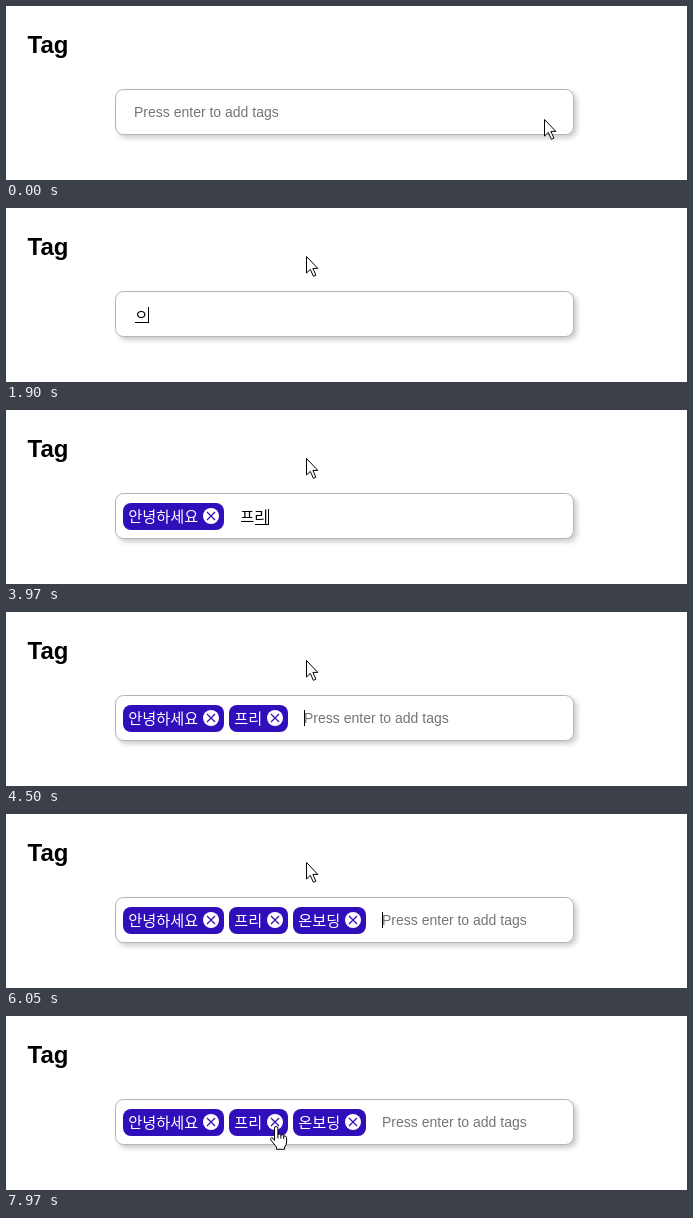
These frames come from a looping animation (681x174 px, 8000 ms). An HTML page:

```html
<!DOCTYPE html>
<html lang="ko">
<head>
<meta charset="utf-8">
<title>Tag input</title>
<style>
html, body { margin: 0; width: 681px; height: 174px; overflow: hidden; background: #fff; }
svg { display: block; }
text { font: 15.2px "Noto Sans CJK KR", "Noto Sans CJK", sans-serif; }
.title { font: bold 24px "Liberation Sans", Arial, sans-serif; }
.hint { font: 14px "Liberation Sans", Arial, sans-serif; fill: #757575; }
.box { fill: #fff; stroke: #b4b4b4; filter: drop-shadow(3px 3px 2.5px rgba(0, 0, 0, .2)); }
.tag rect { fill: #300fbb; }
.tag text, .tag circle { fill: #fff; }
.tag path { stroke: #300fbb; stroke-width: 1.2; }
.cursor { fill: #fff; stroke: #000; stroke-linejoin: round; }
</style>
</head>
<body>
<svg width="681" height="174">
  <text class="title" x="21.5" y="47">Tag</text>
  <rect class="box" x="109.5" y="83.5" width="458" height="45" rx="8"/>
  <g id="tags"></g>
  <text class="hint" id="hint" y="111">Press enter to add tags</text>
  <text id="typed" y="112"></text>
  <rect id="underline" y="114" height="1"/>
  <rect id="caret" width="1" height="16"/>
  <g id="pointer">
    <path id="arrow" class="cursor" d="M.5 .5V17L4.3 13.4L7.4 20.3L9.9 19.2L6.9 12.4H11.8Z"/>
    <path id="beam" fill="none" stroke="#000" d="M-3 -8.5H-1Q.5 -8.5 .5 -7V7Q.5 8.5 -1 8.5H-3M4 -8.5H2Q.5 -8.5 .5 -7M.5 7Q.5 8.5 2 8.5H4"/>
    <path id="hand" class="cursor" d="M-1.5 14.5V2.2a1.7 1.7 0 0 1 3.4 0V8.5q1.6-1.2 3 .6q1.8-.8 2.8 .8q2.4-.5 2.9 1.8V16q0 3-2 5v2.3H.5V21L-4.8 14.6q-1.4-2.2 .4-2.9q1.4-.2 2.9 2.8ZM1.9 8.5v4M4.9 9.1v3.6M7.7 9.9v3"/>
  </g>
</svg>
<script>
const LOOP = 8000, CHAR = 14, BLINK = 530, FOCUS = 560;
const $ = id => document.getElementById(id);
const set = (id, attrs) => { for (const k in attrs) $(id).setAttribute(k, attrs[k]); };
const show = (el, on) => { el.style.display = on ? '' : 'none'; };

// time added, label, left edge
const tags = [[3240, '안녕하세요', 117], [4500, '프리', 223], [6050, '온보딩', 287]];
const tagEnd = ([, label, x]) => x + 31 + CHAR * label.length;

// input content after each edit; the last syllable is being composed
const edits = [
  [0, ''],
  [1900, 'ㅇ'], [1990, '아'], [2080, '안'], [2180, '안ㄴ'], [2270, '안녀'], [2360, '안녕'],
  [2450, '안녕ㅎ'], [2540, '안녕하'], [2640, '안녕핫'], [2710, '안녕하세'], [2840, '안녕하세요'],
  [3240, ''], [3700, 'ㅍ'], [3800, '프'], [3890, '플'], [3970, '프리'],
  [4500, ''], [4900, 'ㅇ'], [5000, '오'], [5110, '온'], [5230, '온ㅂ'], [5300, '온보'],
  [5400, '온볻'], [5500, '온보디'], [5650, '온보딩'],
  [6050, '']
];

// pointer moves: start, end, from, to
const moves = [
  [40, 570, [538, 113], [290, 106]],
  [710, 1090, [290, 106], [300, 48]],
  [7200, 7900, [300, 48], [270.5, 104]],
  [7900, 7970, [270.5, 104], [269.5, 110]]
];

$('tags').innerHTML = tags.map(tag => {
  const [, label, x] = tag, end = tagEnd(tag);
  return `<g class="tag"><rect x="${x}" y="93" width="${end - x}" height="27" rx="8"/>
    <text x="${x + 5.3}" y="112">${label}</text><circle cx="${end - 13}" cy="106" r="8"/>
    <path d="M${end - 17} 102l8 8m0-8l-8 8"/></g>`;
}).join('');

function pointerAt(t) {
  const [start, end, from, to] = moves.filter(m => t >= m[0]).pop() || moves[0];
  const p = Math.min(1, Math.max(0, (t - start) / (end - start)));
  const ease = p * p * (3 - 2 * p);
  return from.map((v, i) => v + (to[i] - v) * ease);
}

function draw(t) {
  const added = tags.filter(tag => t >= tag[0]);
  [...$('tags').children].forEach((el, i) => show(el, i < added.length));
  const left = added.length ? tagEnd(added[added.length - 1]) + 16 : 128;

  const [last, text] = edits.filter(e => t >= e[0]).pop();
  const n = text.length;
  show($('hint'), !n);
  set('hint', { x: left });
  $('typed').textContent = text;
  set('typed', { x: left + .2 });
  show($('underline'), n);
  set('underline', { x: left + CHAR * (n - 1) + 1, width: CHAR - 1 });

  const blink = Math.floor((t - Math.max(last, FOCUS)) / BLINK);
  show($('caret'), t >= FOCUS && blink % 2 === 0);
  set('caret', { x: left + CHAR * n, y: n ? 99 : 98 });

  const [x, y] = pointerAt(t).map(Math.round);
  const kind = t > 7000 && y > 98 ? 'hand' : t < 1200 && x < 308 && y > 97 ? 'beam' : 'arrow';
  for (const id of ['arrow', 'beam', 'hand']) show($(id), id === kind);
  set('pointer', { transform: `translate(${x} ${y})` });
}

function frame() {
  draw(performance.now() % LOOP);
  requestAnimationFrame(frame);
}
frame();
</script>
</body>
</html>
```
